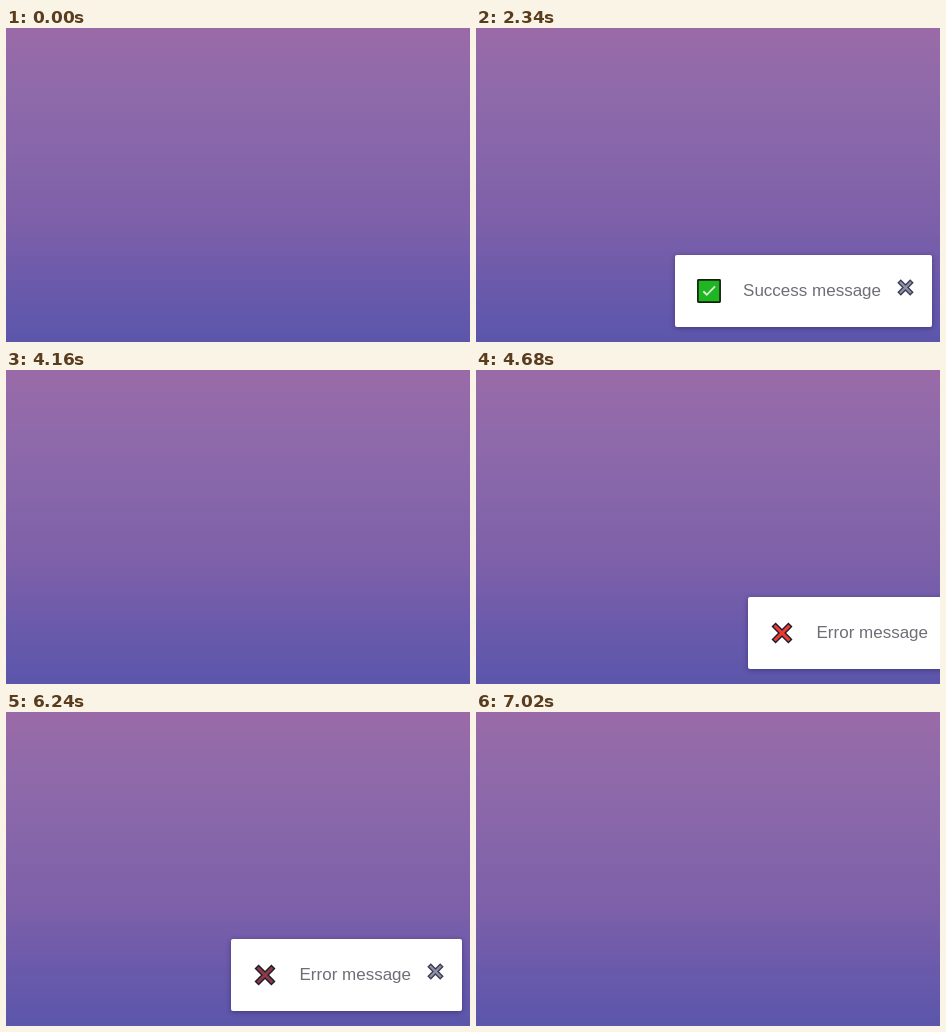
Write an HTML page that moves like this. It is 464 by 314 pixels and loops after 7.93 s.

```html
<!DOCTYPE html>
<html lang="en">
<head>
<meta charset="utf-8">
<title>Toast notifications</title>
<style>
  html, body { margin: 0; width: 100%; height: 100%; overflow: hidden; }
  body {
    position: relative;
    background: linear-gradient(#9a6aa7, #8f6aaa 20%, #7d60a9 62%, #6b5aab 81%, #5b56ab);
  }
  .toast {
    --ease: cubic-bezier(.68, -.55, .265, 1.55);
    position: absolute;
    top: 227px;
    right: 8px;
    height: 71.5px;
    border-radius: 2px;
    background: #fff;
    box-shadow: 0 1px 5px rgba(20, 10, 50, .4);
    font: 17px/20px "Liberation Sans", Arial, sans-serif;
    color: #706d76;
  }
  .success { width: 257px; }
  .error { width: 231px; }
  .toast span { position: absolute; right: 51px; top: 26px; white-space: nowrap; }
  .toast svg { position: absolute; fill: none; stroke-linecap: square; }
  .icon { left: 22px; top: 24px; }
  .close { right: 18px; top: 24px; }
  .edge { stroke: #1c1c2c; stroke-width: 5.8; }
  .core { stroke-width: 3; }
  .close .edge { stroke: #3c3c52; stroke-width: 5; }
  .close .core { stroke: #8f8fa8; stroke-width: 2.3; }

  /* The clock script seeks every paused animation through --t. */
  .toast, .green, .red {
    animation: 7930ms linear calc(var(--t, 0) * -1ms) infinite paused both;
  }
  .success { animation-name: success; }
  .error { animation-name: error; }
  .green { animation-name: green; }
  .red { animation-name: red; }

  /* Each slide takes 500ms and swings past its end. */
  @keyframes success {
    0%, 53.897%, 100% { transform: translateX(400px); }
    21.778% { transform: translateX(400px); animation-timing-function: var(--ease); }
    28.083% { transform: translateX(0); }
    47.591% { transform: translateX(0); animation-timing-function: var(--ease); }
  }
  @keyframes error {
    0%, 90.643%, 100% { transform: translateX(400px); }
    55.258% { transform: translateX(400px); animation-timing-function: var(--ease); }
    61.564% { transform: translateX(0); }
    84.338% { transform: translateX(0); animation-timing-function: var(--ease); }
  }
  @keyframes green {
    0%, 38.5% { fill: #20b622; }
    44.2%, 100% { fill: #258b25; }
  }
  @keyframes red {
    0%, 73% { stroke: #f03c30; }
    78.6%, 100% { stroke: #8c3a44; }
  }
</style>
</head>
<body>
  <div class="toast success">
    <svg class="icon" width="24" height="24">
      <rect class="green" x=".9" y=".9" width="22.2" height="22.2" rx=".6" stroke="#14200f" stroke-width="1.7"/>
      <path d="M7 13L9.8 15.8L17.4 8" stroke="#dcf0dc" stroke-width="1.8"/>
    </svg>
    <span>Success message</span>
    <svg class="close" width="17" height="17">
      <path class="edge" d="M3.8 3.8L13.2 13.2M13.2 3.8L3.8 13.2"/>
      <path class="core" d="M3.8 3.8L13.2 13.2M13.2 3.8L3.8 13.2"/>
    </svg>
  </div>

  <div class="toast error">
    <svg class="icon" width="24" height="24">
      <path class="edge" d="M5.6 5.6L18.4 18.4M18.4 5.6L5.6 18.4"/>
      <path class="core red" d="M5.6 5.6L18.4 18.4M18.4 5.6L5.6 18.4"/>
    </svg>
    <span>Error message</span>
    <svg class="close" width="17" height="17">
      <path class="edge" d="M3.8 3.8L13.2 13.2M13.2 3.8L3.8 13.2"/>
      <path class="core" d="M3.8 3.8L13.2 13.2M13.2 3.8L3.8 13.2"/>
    </svg>
  </div>

  <script>
    const LOOP = 7930, STEP = 130;
    const start = performance.now();

    function tick() {
      const t = (performance.now() - start) % LOOP;
      document.body.style.setProperty('--t', Math.floor(t / STEP) * STEP);
      requestAnimationFrame(tick);
    }
    tick();
  </script>
</body>
</html>
```
